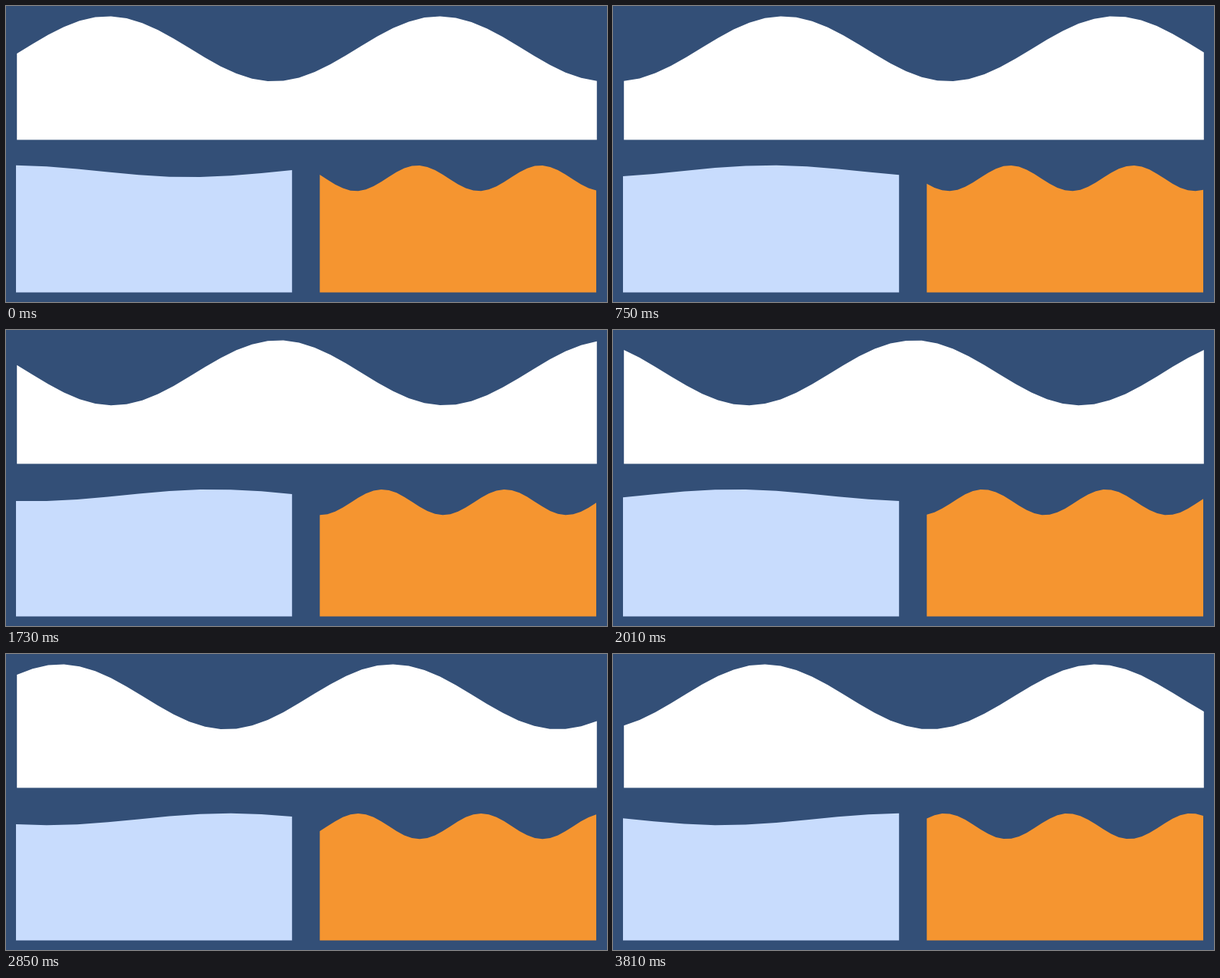
Recreate the animation shown at these times as an HTML page with a canvas. Size 782x386 px, loop 3.86 s.

```html
<!DOCTYPE html>
<html lang="en">
<head>
<meta charset="utf-8">
<title>Waves</title>
<style>
  html, body { margin: 0; height: 100%; overflow: hidden; background: #334f77; }
  canvas { display: block; }
</style>
</head>
<body>
<canvas width="782" height="386"></canvas>
<script>
const ctx = document.querySelector('canvas').getContext('2d');
const LOOP = 3860;

// Step counts reached at a few moments; the pose holds between steps.
const MARKS = [[0, 0], [30, 1], [580, 10], [1160, 20], [1730, 30],
               [2290, 40], [2850, 50], [3420, 60], [LOOP, 68]];

// crest: x of a crest at step 0; shift: px per step
const WAVES = [
  { color: '#fff', left: 14.2, right: 768.8, bottom: 174.5, mid: 55.8, amp: 42.4,
    length: 431.8, crest: 132.3, shift: 7.41, segments: 37 },
  { color: '#c8dcfd', left: 13, right: 372.2, bottom: 373.5, mid: 215.5, amp: 7.7,
    length: 470, crest: 4.5, shift: -22.5, segments: 9 },
  { color: '#f59530', left: 408.3, right: 768, bottom: 373.5, mid: 224.6, amp: 16.7,
    length: 160, crest: 535.5, shift: -1.545, segments: 36 },
];

function stepAt(time) {
  const next = MARKS.findIndex(([t]) => t > time);
  const [t0, s0] = MARKS[next - 1];
  const [t1, s1] = MARKS[next];
  return Math.floor(s0 + (s1 - s0) * (time - t0) / (t1 - t0) + 0.05);
}

function drawWave(w, step) {
  const crest = w.crest + w.shift * step;
  ctx.beginPath();
  ctx.moveTo(w.left, w.bottom);
  for (let i = 0; i <= w.segments; i++) {
    const x = w.left + (w.right - w.left) * i / w.segments;
    ctx.lineTo(x, w.mid - w.amp * Math.cos(2 * Math.PI * (x - crest) / w.length));
  }
  ctx.lineTo(w.right, w.bottom);
  ctx.fillStyle = w.color;
  ctx.fill();
}

function render() {
  const step = stepAt(performance.now() % LOOP);
  ctx.clearRect(0, 0, 782, 386);
  WAVES.forEach(w => drawWave(w, step));
  requestAnimationFrame(render);
}
render();
</script>
</body>
</html>
```
